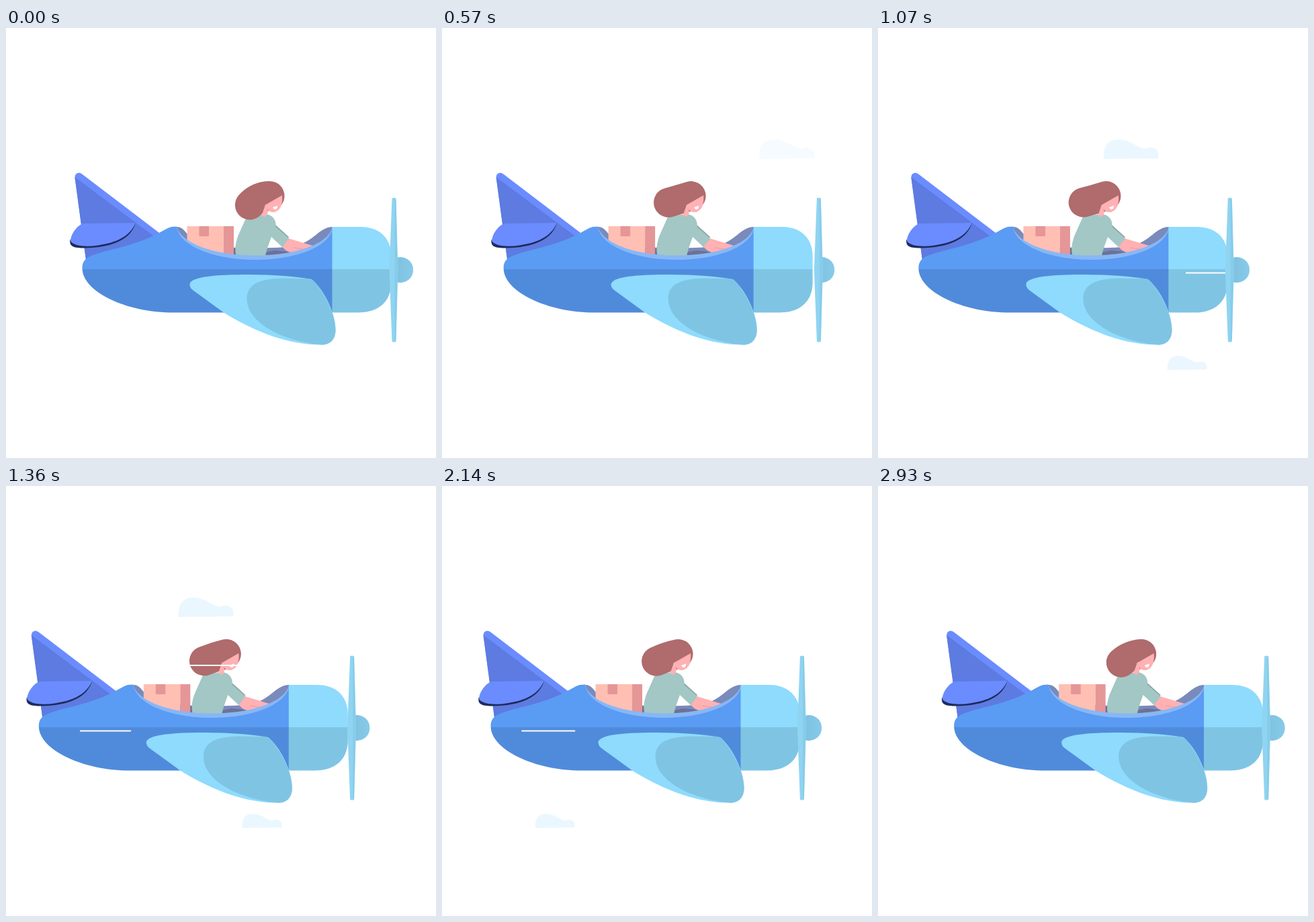
An HTML page for the animation above (3000 ms loop, 640x640 px).

```html
<!DOCTYPE html>
<html lang="en">
<head>
<meta charset="utf-8">
<title>Delivery plane</title>
<style>
html, body { margin: 0; width: 100%; height: 100%; overflow: hidden; background: #fff; }
svg { display: block; width: 100%; height: 100%; }
</style>
</head>
<body>
<svg viewBox="0 0 640 640">
  <defs>
    <linearGradient id="hull" gradientUnits="userSpaceOnUse" x1="0" y1="295" x2="0" y2="424">
      <stop offset=".5" stop-color="#5a9bf3"/><stop offset=".5" stop-color="#508bdb"/>
    </linearGradient>
    <linearGradient id="cowl" gradientUnits="userSpaceOnUse" x1="0" y1="295" x2="0" y2="424">
      <stop offset=".5" stop-color="#8edbfd"/><stop offset=".5" stop-color="#80c4e4"/>
    </linearGradient>
    <linearGradient id="nose">
      <stop offset="0" stop-color="#7dc0e0"/><stop offset="1" stop-color="#88cbe8"/>
    </linearGradient>
    <path id="cloud" fill="#ebf7ff" d="M0 29C0 10 6 0 22 0C40 0 50 12 62 14C70 9 82 12 82 23V28Z"/>
  </defs>

  <g id="clouds"></g>

  <g class="plane">
    <!-- tail -->
    <path fill="#6a8cff" d="M102.500 223Q102 216 109 215.500Q111 215.500 114 218L240 314L119 345Z"/>
    <path fill="#5d7be0" d="M102.500 222L219 309L200 345H119Z"/>
    <path fill="#1f2b5c" d="M95.500 315C94 324 99 327.500 115 327.500C160 327 186 314 193 290Z"/>
    <path fill="#6a8cff" d="M193 290L115 291C105 294 96 308 96 317C101 325 120 326 137 323.500C166 319 184 310 193 290Z"/>

    <!-- cockpit and parcel -->
    <path fill="#7a8abb" d="M254 296C266 295 268 310 285 320C310 328 400 330 430 324C458 319 466 296 486 296C484 325 432 345 371 345C310 345 258 325 254 296Z"/>
    <path fill="#6c7296" d="M336 328H344V340H336ZM386 334L400 331L432 334L420 339H384Z"/>
    <path fill="#ffbfb3" d="M269.500 295H324V345H269.500Z"/>
    <path fill="#e59697" d="M324 295H339V345H324ZM287.500 295H302V310H287.500Z"/>

    <!-- pilot -->
    <path fill="#8aa7a5" d="M400 292L421 311L416 318L399 306Z"/>
    <path fill="#ffb1b3" d="M420 313L440 319L463 326L456 330L425 334C418 334 414 328 410 325Z"/>
    <path fill="none" stroke="#e59697" stroke-width=".8" d="M428 327L448 330"/>
    <path fill="#a2c7c5" d="M358 281L383 277C397 276 403 287 401.500 296L421 313L411 326L395 311C391 322 387 332 385 345H344C339 330 342 318 346 308Z"/>
    <path id="hair" fill="none" stroke="#b06b6c" stroke-width="44" stroke-linecap="round"/>
    <path fill="#ffb1b3" d="M386 263L380.500 279C385 283 389 280 390 273Z"/>
    <path fill="#ffb1b3" d="M411 249C412 262 409 271 400 274C393 275.500 388 271 385.500 263.500Z"/>
    <path fill="#fff" d="M397 267L404 264.500C404.500 270.500 399 272 397 267Z"/>

    <!-- fuselage and wing -->
    <path fill="#88b7f6" d="M486 296C480 322 430 338.500 371 338.500C312 338.500 262 322 254 296L258 330L371 350L480 330Z"/>
    <path fill="url(#hull)" d="M246 296L254 295.500C258 325 310 345 371 345C432 345 484 325 486 296V423.500H250C178 423.500 113 392 113.500 357C113.500 349 117 343 127 339C141 333 160 330 186 322C225 310 235 299 246 296Z"/>
    <path fill="url(#cowl)" d="M485.500 296H528C555 296 573.500 312 573.500 340V378C573.500 407 555 423.500 524 423.500H485.500Z"/>
    <path fill="#8edbfd" d="M273.500 381C276 370 312 367 360 367C400 367 432 370 455 374C470 386 490 420 490.500 448C491 462 484 471.500 470 471.500C425 472 375 455 324 423.500L280 391.500Q273 387 273.500 381Z"/>
    <path fill="#80c4e4" d="M358.500 402C359 378 385 372.500 415 372.500L447 373C452 373 455 374 458 377C474 395 490 425 490.500 448C491 462 484 471.500 470 471.500C415 467 358 440 358.500 402Z"/>
  </g>

  <path id="wind" fill="none" stroke="#fff" stroke-width="2"/>

  <g class="plane">
    <path fill="url(#nose)" d="M579 343C586 338 606 342 606 360C606 378 586 382 579 377Z"/>
    <g id="blade">
      <path fill="#8fd4f1" d="M-3 254Q-3 252.500 0 252.500Q3 252.500 3 254L6 360L3 466Q3 467.500 0 467.500Q-3 467.500 -3 466L-7 360Z"/>
      <path fill="#83c8e6" opacity=".6" d="M1 255H3L5.500 360L3 465H1Z"/>
    </g>
  </g>
</svg>
<script>
const LOOP = 3000, TAU = 2 * Math.PI;
const $ = id => document.getElementById(id);
const clamp = v => Math.max(0, Math.min(1, v));
const mix = (a, b, k) => a + (b - a) * k;

const clouds = [
  { x: 628, y: 166, size: 1, from: 480, to: 2060, alpha: 1 },
  { x: 723, y: 488, size: .72, from: 770, to: 2560, alpha: 1 },
  { x: 603, y: 302, size: .72, from: 480, to: 2000, alpha: .5 }
];
for (const c of clouds) {
  c.el = document.createElementNS("http://www.w3.org/2000/svg", "use");
  c.el.setAttribute("href", "#cloud");
  $("clouds").append(c.el);
}

const gusts = [
  { y: 267, starts: [1052, 2847] },
  { y: 364.5, starts: [2, 936, 1723] },
  { y: 461.5, starts: [500, 1543] }
];

// A streak flies leftwards, growing and then shrinking
function streak(y, start, t) {
  const u = ((t - start + LOOP) % LOOP) / 500;
  if (u >= 1) return "";
  return `M${620 - 600 * u} ${y}h${122 * Math.sin(Math.PI * u) ** .6}`;
}

function drawPlane(t) {
  const p = t / LOOP;
  const back = 33.25 * (1 - Math.cos(TAU * p)) + 1.4 * Math.sin(2 * TAU * p) * (1 - p);
  for (const g of document.querySelectorAll(".plane")) g.setAttribute("transform", `translate(${-back} 0)`);
  $("blade").setAttribute("transform", `translate(${579.8 + 3 * Math.cos(TAU * (t - 610) / 1000)} 0)`);
}

function drawHair(t) {
  const lift = .55 * Math.sqrt(Math.sin(Math.PI * t / LOOP)) + .45 * Math.exp(-(((t - 790) / 300) ** 2));
  const x = mix(363, 357, lift), y = mix(263.5, 258, lift);
  $("hair").setAttribute("d", `M392.500 250Q${mix(375, 377, lift)} ${mix(250, 257, lift)} ${x} ${y}`);
}

function drawSky(t) {
  for (const c of clouds) {
    const fade = clamp(Math.min((t - c.from) / 200, (c.to - t) / 300));
    c.el.setAttribute("transform", `translate(${c.x - .273 * t} ${c.y}) scale(${c.size})`);
    c.el.setAttribute("opacity", c.alpha * fade);
  }
  $("wind").setAttribute("d", gusts.flatMap(g => g.starts.map(s => streak(g.y, s, t))).join(""));
}

function draw(t) {
  drawPlane(t);
  drawHair(t);
  drawSky(t);
}

const begin = performance.now();
function tick() {
  draw((performance.now() - begin) % LOOP);
  requestAnimationFrame(tick);
}
draw(0);
requestAnimationFrame(tick);
</script>
</body>
</html>
```
